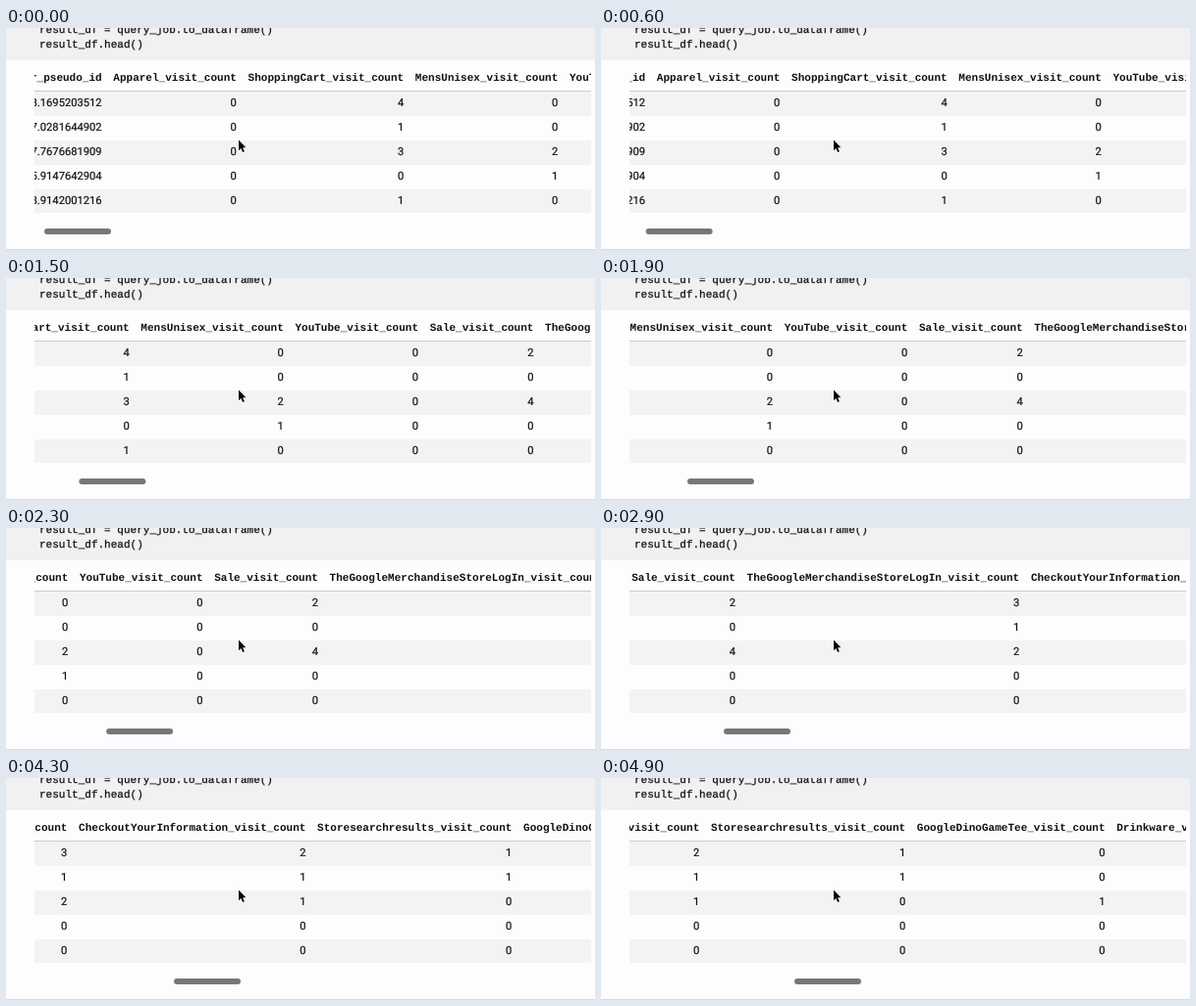
These frames come from a looping animation (600 by 227 pixels, 5 s). An HTML page:

```html
<!DOCTYPE html>
<html lang="en">
<head>
<meta charset="utf-8">
<title>Dataframe scroll</title>
<style>
  html, body { margin: 0; width: 100%; height: 100%; overflow: hidden; background: #fdfcfe; }
  #stage {
    position: relative; width: 600px; height: 227px; overflow: hidden;
    color: #111; background: #fdfcfe; text-rendering: geometricPrecision;
  }
  #stage > * { position: absolute; }
  .code, .head { font: 11.03px/15px "Courier New", "Liberation Mono", monospace; white-space: pre; }
  .code {
    left: 0; top: 0; width: 600px; height: 33px; background: #f1f0f2;
    overflow: hidden; -webkit-text-stroke: .25px #111;
  }
  .code div { position: relative; left: 34px; top: -4px; }
  .view { left: 29px; top: 40px; width: 567px; height: 149px; overflow: hidden; }
  .view > * { position: absolute; }
  .stripe { left: 0; width: 567px; height: 24.5px; background: #f3f2f4; }
  .rule { left: 0; top: 24px; width: 567px; height: 1px; background: #cccbcd; }
  #cols { left: -23.9px; top: 0; display: flex; }
  .col { flex: none; margin-right: 11.65px; text-align: right; }
  .head { height: 25.4px; line-height: 25px; font-weight: bold; }
  .cell {
    height: 24.8px; font: 11.2px/24.8px Roboto, Arial, sans-serif;
    -webkit-text-stroke: .2px #111;
  }
  #thumb { left: 39px; top: 205px; width: 68px; height: 6px; border-radius: 3px; background: #777678; }
  .foot { left: 0; top: 226px; width: 600px; height: 1px; background: #dad9db; }
  svg { left: 234px; top: 112px; }
</style>
</head>
<body>
<div id="stage">
  <div class="code"><div>result_df = query_job.to_dataframe()
result_df.head()</div></div>
  <div class="view">
    <div class="stripe" style="top:25px"></div>
    <div class="stripe" style="top:75px"></div>
    <div class="stripe" style="top:124.5px"></div>
    <div class="rule"></div>
    <div id="cols"></div>
  </div>
  <div id="thumb"></div>
  <div class="foot"></div>
  <svg width="14" height="20" viewBox="0 0 14 20">
    <path d="M3 2.6V13.2l2.4-2.2 1.7 4 1.8-.8-1.7-3.9h3.2z" fill="#000" stroke="#fff" stroke-width="1.6" stroke-linejoin="round" paint-order="stroke"/>
  </svg>
</div>
<script>
const LOOP = 5000, STEP = 100, THUMB_RATIO = 0.1265;

const table = [
  ["user_pseudo_id", ["8.1695203512", "7.0281644902", "7.7676681909", "5.9147642904", "8.9142001216"]],
  ["Apparel", "00000"],
  ["ShoppingCart", "41301"],
  ["MensUnisex", "00210"],
  ["YouTube", "00000"],
  ["Sale", "20400"],
  ["TheGoogleMerchandiseStoreLogIn", "31200"],
  ["CheckoutYourInformation", "21100"],
  ["Storesearchresults", "11000"],
  ["GoogleDinoGameTee", "00100"],
  ["Drinkware", "00000"]
];

// time in ms, scroll in px, speed in px per step
const path = [
  [0, 0, 2], [600, 52.5, 18], [1500, 279.5, 26], [2300, 499, 28],
  [2900, 680, 37], [3600, 986, 7], [3700, 990, 0], [4000, 990, 0], [4900, 1249, 20]
];

const cols = document.getElementById("cols");
const thumb = document.getElementById("thumb");

function add(parent, cls, text = "") {
  const el = document.createElement("div");
  el.className = cls;
  el.textContent = text;
  parent.append(el);
  return el;
}

table.forEach(([name, values], i) => {
  const col = add(cols, "col");
  add(col, "head", i ? name + "_visit_count" : name);
  for (const v of values) add(col, "cell", v);
});

function scrollAt(t) {
  let i = 0;
  while (i < path.length - 2 && t >= path[i + 1][0]) i++;
  const [t0, x0, v0] = path[i], [t1, x1, v1] = path[i + 1];
  const n = (t1 - t0) / STEP, u = (t - t0) / (t1 - t0), w = 1 - u;
  return w * w * (1 + 2 * u) * x0 + u * u * (3 - 2 * u) * x1
    + n * u * w * (w * v0 - u * v1);
}

function draw() {
  const t = Math.floor(performance.now() % LOOP / STEP) * STEP;
  const x = scrollAt(t);
  cols.style.transform = `translateX(${-x}px)`;
  thumb.style.transform = `translateX(${x * THUMB_RATIO}px)`;
  requestAnimationFrame(draw);
}
draw();
</script>
</body>
</html>
```
